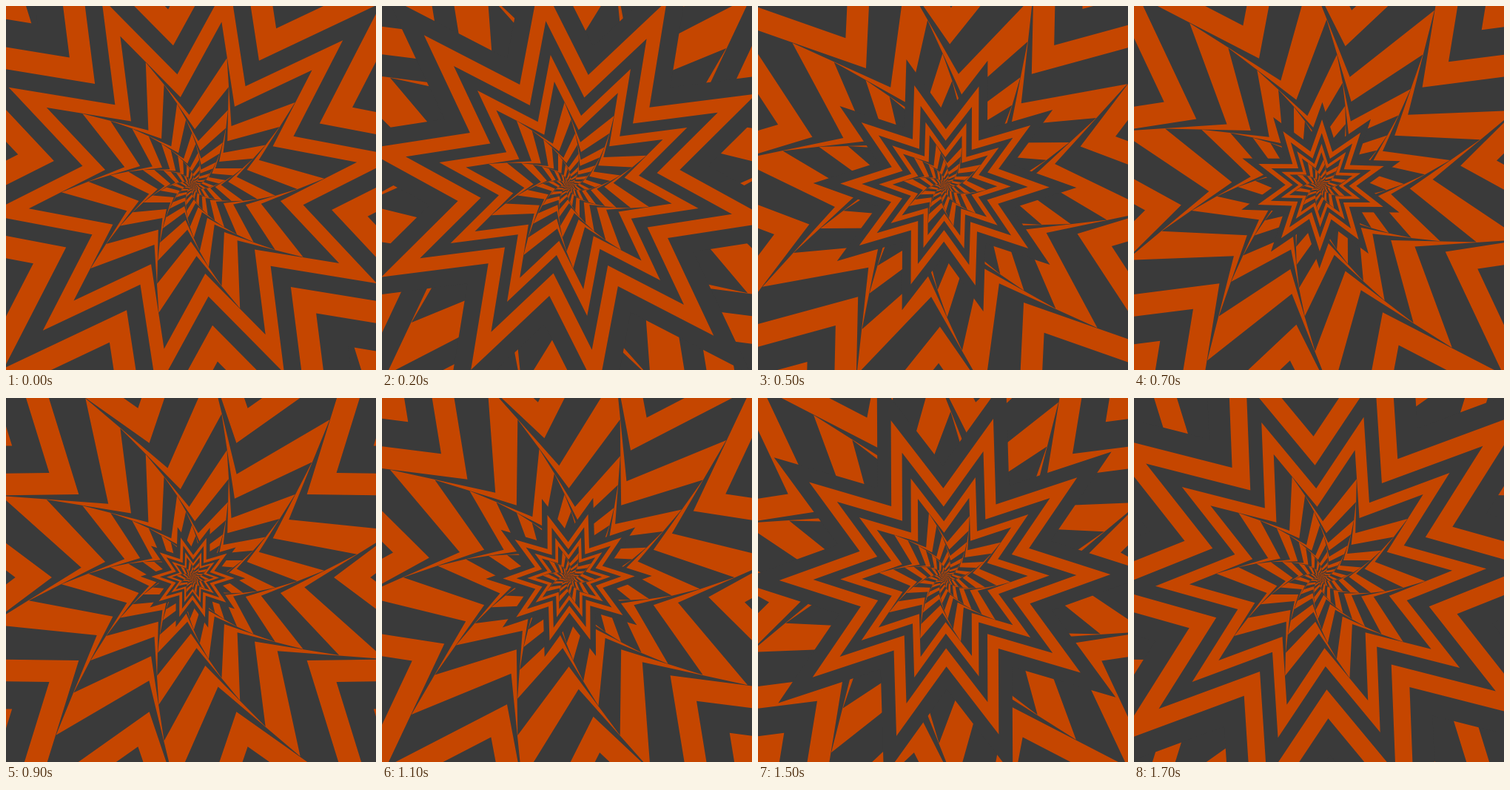
These frames come from a looping animation (500 by 491 pixels, 1.8 s). An HTML page with a canvas:

```html
<!DOCTYPE html>
<html lang="en">
<head>
<meta charset="utf-8">
<title>Star tunnel</title>
<style>
  html, body { margin: 0; width: 100%; height: 100%; overflow: hidden; background: #3a3a3a; }
  canvas { display: block; }
</style>
</head>
<body>
<canvas id="stage" width="500" height="491"></canvas>
<script>
const ctx = document.getElementById('stage').getContext('2d');
const DARK = '#3a3a3a', ORANGE = '#c54600';
const CX = 252.5, CY = 242;
const STEPS = 18, STEP_MS = 100;
const VALLEY = 0.537;   // valley radius relative to tip radius
const TWIST = 5;        // degrees between neighbouring stars
const RINGS = 28;

// Ten stars per decade of size
const radiusOf = ring => 10 ** (2.75 - ring / 10);

function star(radius, degrees, color) {
  ctx.beginPath();
  for (let k = 0; k < 20; k++) {
    const a = (degrees + k * 18) * Math.PI / 180;
    const r = k % 2 ? radius * VALLEY : radius;
    ctx.lineTo(CX + r * Math.cos(a), CY + r * Math.sin(a));
  }
  ctx.fillStyle = color;
  ctx.fill();
}

// Nested stars: aligned from ring `first` to `aligned`, twisting further in
function tunnel(first, aligned, angle, parity) {
  for (let ring = first; ring <= RINGS; ring++) {
    const twist = TWIST * Math.max(ring, aligned);
    star(radiusOf(ring), angle + twist, (ring + parity) % 2 ? DARK : ORANGE);
  }
}

function draw(step) {
  const depth = Math.min(step, STEPS - step);   // zooms in, then back out
  const lead = Math.min(4, Math.max(0, step - 11));
  const angle = 8 + 4 * step + lead;
  tunnel(-4, 2, angle, step);
  tunnel(depth, depth + 4, angle, step + 1);
}

const start = performance.now();
function tick() {
  const elapsed = Math.max(0, performance.now() - start);
  draw(Math.floor(elapsed / STEP_MS) % STEPS);
  requestAnimationFrame(tick);
}
tick();
</script>
</body>
</html>
```
